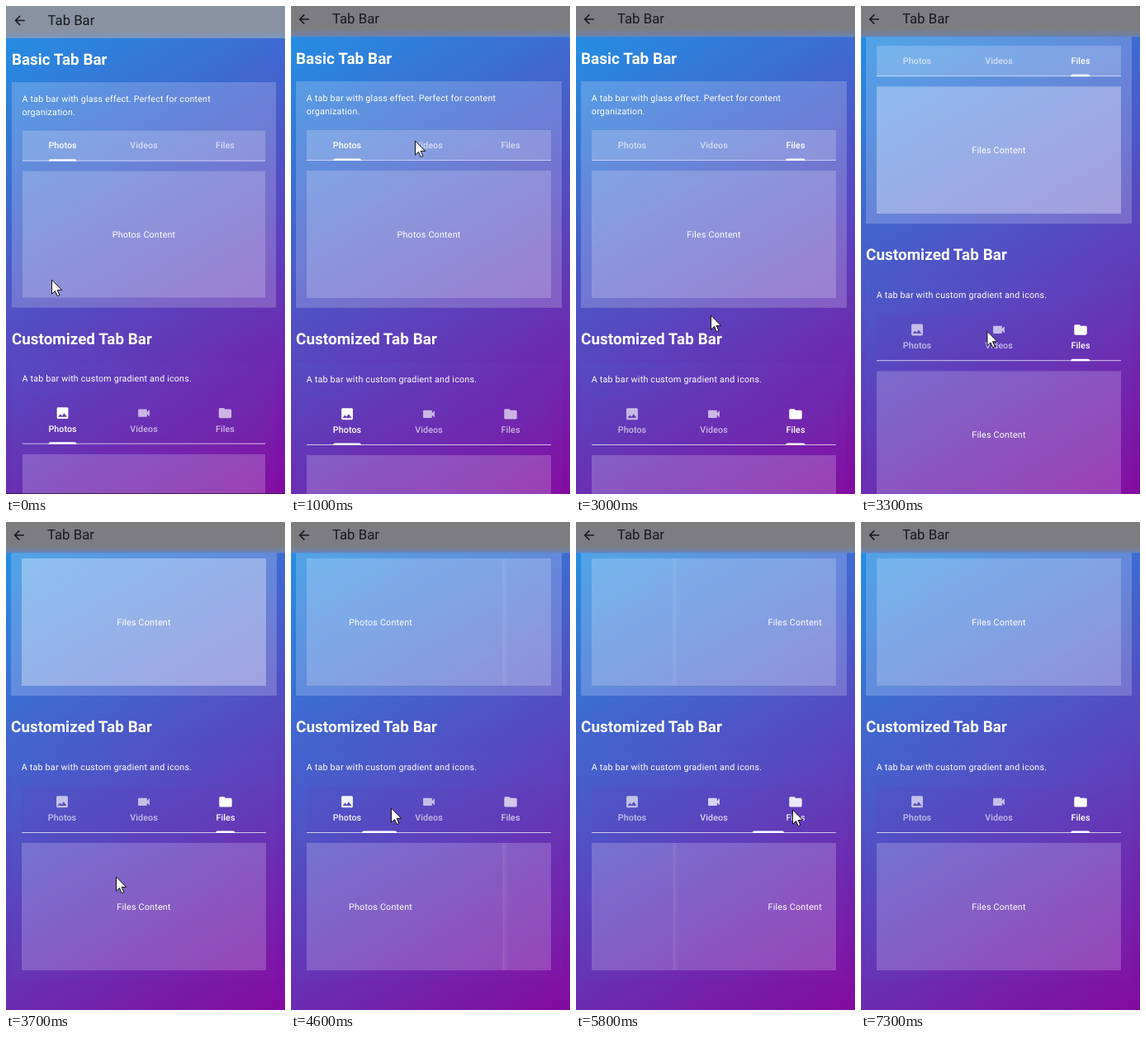
An HTML page that plays this animation: 338 by 590 pixels, repeating every 7.4 s.

```html
<!DOCTYPE html>
<html lang="en">
<head>
<meta charset="utf-8">
<title>Tab Bar</title>
<style>
  html, body { margin: 0; width: 100%; height: 100%; overflow: hidden; }
  body { background: linear-gradient(150.2deg, #2094e6, #840aa0); }
  svg { display: block; width: 100vw; height: 100vh; }
  text { font: 400 10.72px Roboto, sans-serif; letter-spacing: .21px; fill: #fff; text-rendering: geometricPrecision; }
  .heading { font-weight: 700; font-size: 18.9px; letter-spacing: .05px; }
  .label { font-weight: 500; letter-spacing: .08px; }
  .title { font-size: 16.8px; letter-spacing: 0; fill: #18181c; }
  .mid { text-anchor: middle; }
</style>
</head>
<body>
<svg id="stage" viewBox="0 0 338 590">
  <defs>
    <linearGradient id="barFade" x2="0" y2="1">
      <stop offset=".76" stop-color="#7d7d81"/>
      <stop offset=".92" stop-color="#75809a"/>
      <stop offset="1" stop-color="#6086c4"/>
    </linearGradient>
    <linearGradient id="tint" x2="1" y2="1">
      <stop stop-color="#2196f3" stop-opacity=".05"/>
      <stop offset="1" stop-color="#9c27b0" stop-opacity=".07"/>
    </linearGradient>
    <linearGradient id="edge">
      <stop stop-color="#fff" stop-opacity=".09"/>
      <stop offset="1" stop-color="#fff" stop-opacity="0"/>
    </linearGradient>
  </defs>
</svg>
<script>
const LOOP = 7400, STEP = 100, PAGE = 296, SCROLL = 155;
const NAMES = ['Photos', 'Videos', 'Files'];
const CENTERS = [68, 167, 266];
const SPANS = [[51, 85], [150, 184], [254, 277.5]];
const ICONS = [
  'M21 19V5c0-1.1-.9-2-2-2H5c-1.1 0-2 .9-2 2v14c0 1.1.9 2 2 2h14c1.1 0 2-.9 2-2zM8.5 13.5l2.5 3.01L14.5 12l4.5 6H5z',
  'M17 10.5V7c0-.55-.45-1-1-1H4c-.55 0-1 .45-1 1v10c0 .55.45 1 1 1h12c.55 0 1-.45 1-1v-3.5l4 4v-11z',
  'M10 4H4c-1.1 0-2 .9-2 2v12c0 1.1.9 2 2 2h16c1.1 0 2-.9 2-2V8c0-1.1-.9-2-2-2h-8z'
];
const BACK = 'M20 11H7.83l5.59-5.59L12 4l-8 8 8 8 1.41-1.41L7.83 13H20z';

// [time, tab]
const TAPS = [[1150, 1], [1980, 2], [4450, 0], [5080, 1], [5683, 2]];
// [time, x, y]
const POINTER = [
  [0, 56, 331], [200, 56, 331], [900, 151, 163], [1300, 151, 163], [1800, 261, 165],
  [2200, 261, 165], [2900, 164, 374], [3100, 164, 374], [3600, 134, 429], [3800, 134, 429],
  [4300, 68, 351], [4450, 68, 351], [4600, 122, 346], [4900, 163, 349], [5150, 163, 349],
  [5600, 263, 348], [5950, 263, 348], [6400, 250, -22], [LOOP, 250, -22]
];

const stage = document.getElementById('stage');
const mix = (a, b, p) => a + (b - a) * p;
const clamp = v => Math.max(0, Math.min(1, v));

function add(parent, tag, attrs, content) {
  const node = document.createElementNS('http://www.w3.org/2000/svg', tag);
  set(node, attrs);
  if (content) node.textContent = content;
  return parent.appendChild(node);
}
function set(node, attrs) {
  for (const key in attrs) node.setAttribute(key, attrs[key]);
}
const rect = (parent, x, y, width, height, fill, opacity = 1) =>
  add(parent, 'rect', { x, y, width, height, fill, 'fill-opacity': opacity });
const text = (parent, x, y, cls, content) =>
  add(parent, 'text', { x, y, dy: '.355em', class: cls }, content);
const icon = (parent, cx, cy, d, fill = '#fff') =>
  add(parent, 'path', { d, fill, transform: `translate(${cx - 9.24} ${cy - 9.24}) scale(.77)` });
const shift = (node, x, y) => set(node, { transform: `translate(${x} ${y})` });

function makeTabs(parent, labelY, lineY, iconY) {
  const tabs = NAMES.map((name, i) => {
    const tab = add(parent, 'g', {});
    if (iconY) icon(tab, CENTERS[i], iconY, ICONS[i]);
    text(tab, CENTERS[i], labelY, 'label mid', name);
    return tab;
  });
  rect(parent, 19, lineY - 1, PAGE, 1, '#fff', iconY ? .7 : .55);
  return { tabs, lineY, marker: add(parent, 'path', { fill: '#fff' }) };
}

function makePanel(parent, id, y) {
  const clip = add(stage.querySelector('defs'), 'clipPath', { id });
  rect(clip, 19, y, PAGE, 154);
  const view = add(parent, 'g', { 'clip-path': `url(#${id})` });
  const base = rect(view, 19, y, PAGE, 154, '#fff', .2);
  const pages = NAMES.map(name => {
    const page = add(view, 'g', {});
    text(page, 167, y + 77, 'mid', name + ' Content');
    return page;
  });
  return { base, pages, seam: rect(view, 0, y, 7, 154, 'url(#edge)') };
}

const screen = add(stage, 'g', {});
const list = add(screen, 'g', {});

text(list, 6, 62.8, 'heading', 'Basic Tab Bar');
rect(list, 6, 91, 322, 274, '#fff', .2);
text(list, 18.7, 111.4, '', 'A tab bar with glass effect. Perfect for content');
text(list, 18.7, 126.9, '', 'organization.');
rect(list, 19, 150, PAGE, 37, '#fff', .2);
const plainTabs = makeTabs(list, 168, 187);
const plainPanel = makePanel(list, 'plainClip', 199);

text(list, 6, 402.5, 'heading', 'Customized Tab Bar');
rect(list, 6, 431, 322, 278, 'url(#tint)');
text(list, 18.7, 451.3, '', 'A tab bar with custom gradient and icons.');
rect(list, 19, 474, PAGE, 57, '#673ab7', .12);
const iconTabs = makeTabs(list, 512, 531, 493.3);
const iconPanel = makePanel(list, 'iconClip', 543);

rect(screen, -5, -5, 348, 42.5, 'url(#barFade)');
const barTint = rect(screen, -5, -5, 348, 42.5, '#9cb2d4', 0);
icon(screen, 15.7, 16, BACK, '#18181c');
text(screen, 49.9, 15.5, 'title', 'Tab Bar');
const baseLine = rect(stage, 0, 589, 338, 1, '#2b1648', 0);
const pointer = add(stage, 'path', {
  d: 'M-.5 0V17.2l4-3.7 2.7 6.1 2.7-1.1-2.7-6.1h5.5z',
  fill: '#fff', stroke: '#111', 'stroke-width': 1, 'stroke-linejoin': 'round'
});

// cubic-bezier(.25, .1, .25, 1)
function ease(x) {
  if (x <= 0 || x >= 1) return clamp(x);
  let lo = 0, hi = 1, u;
  for (let i = 0; i < 24; i++) {
    u = (lo + hi) / 2;
    if (.75 * u * (1 - u) + u ** 3 < x) lo = u; else hi = u;
  }
  return .3 * u * (1 - u) ** 2 + 3 * u * u * (1 - u) + u ** 3;
}

function tabState(t) {
  let from = 0, to = 0, p = 1;
  for (const [start, tab] of TAPS) {
    if (t < start) break;
    from = to;
    to = tab;
    p = ease((t - start) / 300);
  }
  return { from, to, p };
}

function drawTabs({ tabs, lineY, marker }, { from, to, p }) {
  tabs.forEach((tab, i) => {
    const active = i === to ? p : i === from ? 1 - p : 0;
    set(tab, { opacity: mix(.65, 1, active) });
  });
  const value = mix(from, to, p);
  const low = Math.min(1, Math.floor(value));
  const [left, right] = [0, 1].map(k => mix(SPANS[low][k], SPANS[low + 1][k], value - low));
  const stretch = .63 * (right - left) * Math.min(p, 1 - p);
  const a = left - stretch, b = right + stretch;
  set(marker, { d: `M${a} ${lineY}q0 -2.4 2.4 -2.4H${b - 2.4}q2.4 0 2.4 2.4z` });
}

function drawPanel({ pages, seam }, { from, to, p }) {
  const dir = Math.sign(to - from);
  const moving = p < 1;
  pages.forEach((page, i) => {
    const visible = i === to || (moving && i === from);
    set(page, { visibility: visible ? 'visible' : 'hidden' });
    if (visible) shift(page, i === to ? dir * (1 - p) * PAGE : -dir * p * PAGE, 0);
  });
  const seamX = dir > 0 ? 19 + (1 - p) * PAGE : 19 + p * PAGE;
  set(seam, { x: seamX, visibility: moving ? 'visible' : 'hidden' });
}

function pointerAt(t) {
  const i = POINTER.findIndex((key, n) => n && t <= key[0]);
  const [t0, x0, y0] = POINTER[i - 1], [t1, x1, y1] = POINTER[i];
  const p = (t - t0) / (t1 - t0), s = p * p * (3 - 2 * p);
  return [mix(x0, x1, s), mix(y0, y1, s)];
}

function draw(t) {
  const state = tabState(t);
  [plainTabs, iconTabs].forEach(item => drawTabs(item, state));
  [plainPanel, iconPanel].forEach(item => drawPanel(item, state));

  const scrolled = 1 - (1 - clamp((t - 3150) / 500)) ** 3;
  shift(list, 0, -SCROLL * scrolled);
  set(plainPanel.base, { 'fill-opacity': t >= 3300 && t < 3900 ? .33 : .2 });

  const intro = 1 - clamp(t / 200);
  const scale = 1 - .0055 * intro;
  set(screen, { transform: `translate(169 295) scale(${scale}) translate(-169 -295)` });
  set(barTint, { 'fill-opacity': .4 * intro });
  set(baseLine, { 'fill-opacity': t < STEP ? .8 : 0 });
  shift(pointer, ...pointerAt(t));
}

const began = performance.now();
function tick() {
  const t = (performance.now() - began) % LOOP;
  draw(Math.floor(t / STEP) * STEP);
  requestAnimationFrame(tick);
}
tick();
</script>
</body>
</html>
```
